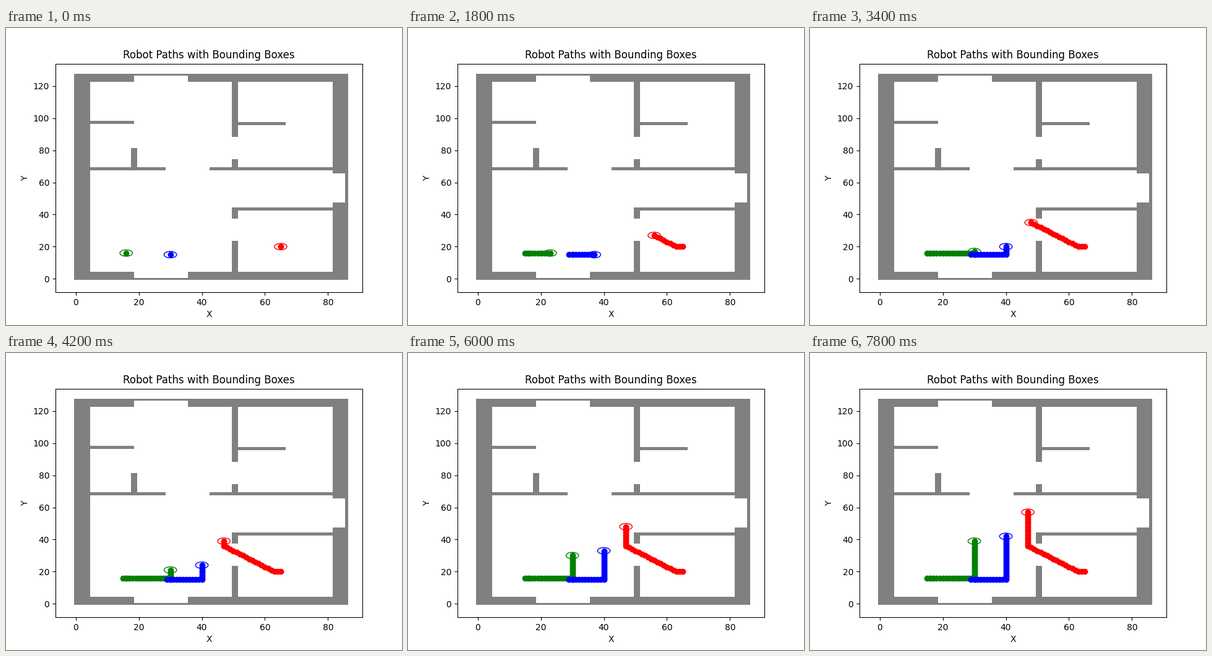
A matplotlib script that plays this animation: 640 by 480 pixels, repeating every 8000 ms.

```python
import numpy as np
import matplotlib.pyplot as plt
from matplotlib.animation import FuncAnimation
from matplotlib.patches import Circle, Rectangle

FRAMES, INTERVAL = 40, 200
RADIUS = 2
COLS, ROWS = 87, 128
THICK, DOOR = 2, 14


def block(x, y, w, h, color="gray"):
    """Fill w by h grid cells, each centred on a whole number."""
    ax.add_patch(Rectangle((x - 0.5, y - 0.5), w, h,
                           facecolor=color, linewidth=0))


def carve(x, y, w, h):
    block(x, y, w, h, "white")


def draw_building():
    block(0, 0, COLS, ROWS)
    carve(5, 5, 77, 118)
    for y in (1, 123):
        carve(19, y, 17, 4)
    carve(82, 48, 4, 18)

    # Main walls, with door gaps and the hall
    block(5, 68, 77, THICK)
    carve(29, 68, DOOR, THICK)
    block(50, 5, THICK, 118)
    for y in (24, 75):
        carve(50, y, THICK, DOOR)
    carve(50, 45, THICK, 23)

    # Partitions
    block(50, 43, 32, THICK)
    block(52, 96, 15, THICK)
    block(5, 97, 14, THICK)
    block(18, 70, THICK, 12)


def walk(start, *goals):
    """Step one cell at a time through the goals, then straight up."""
    pos = np.array(start)
    path = [pos]
    for goal in goals:
        while (pos != goal).any():
            pos = pos + np.sign(goal - pos)
            path.append(pos)
    while len(path) < FRAMES:
        pos = pos + (0, 1)
        path.append(pos)
    return np.array(path)


def span(cells):
    low, high = -RADIUS, cells - 0.5
    pad = 0.05 * (high - low)
    return low - pad, high + pad


fig, ax = plt.subplots(figsize=(6.4, 4.8), dpi=100)
ax.set(title="Robot Paths with Bounding Boxes", xlabel="X", ylabel="Y",
       xlim=span(COLS), ylim=span(ROWS))
draw_building()

routes = {
    "red": walk((65, 20), (63, 20), (47, 36)),
    "green": walk((16, 16), (15, 16), (30, 16)),
    "blue": walk((30, 15), (29, 15), (40, 15)),
}

robots = []
for color, path in routes.items():
    dots, = ax.plot([], [], "o", color=color)
    ring = ax.add_patch(Circle(path[0], RADIUS, fill=False, color=color))
    robots.append((path, dots, ring))


def update(step):
    for path, dots, ring in robots:
        dots.set_data(*path[:step + 1].T)
        ring.center = path[step]
    return [artist for _, dots, ring in robots for artist in (dots, ring)]


anim = FuncAnimation(fig, update, frames=FRAMES, interval=INTERVAL,
                     repeat=True, repeat_delay=0)
plt.show()
```
